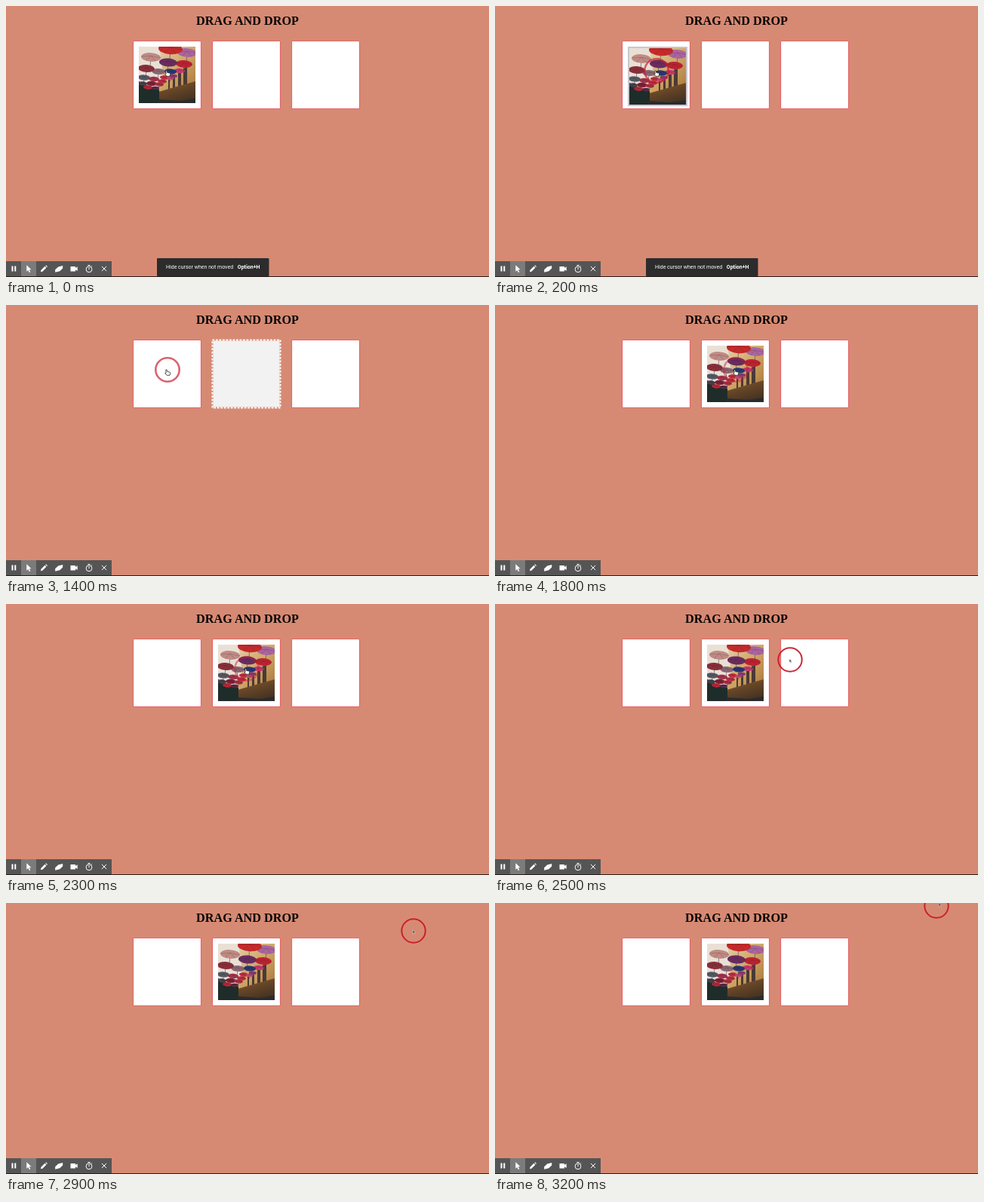
Write an HTML page that moves like this. It is 640x360 px and loops after 3.3 s.

```html
<!DOCTYPE html>
<html lang="en">
<head>
<meta charset="utf-8">
<title>Drag and drop</title>
<style>
html, body { margin: 0; width: 100%; height: 100%; overflow: hidden; background: #d78a73; }
svg { display: block; width: 100vw; height: 100vh; }
.title { font: bold 16.2px "Liberation Serif", Times, serif; text-anchor: middle; }
.toast text { font: 7px Roboto, sans-serif; fill: #fff; }
.toast .key { font-weight: 700; }
.slot { fill: #fff; stroke: #e5666d; stroke-width: 1.2; }
.anim, .anim * { animation: 3.3s step-end infinite; }

/* The picture is picked up at 0.9 s and dropped at 1.7 s. */
#photo { animation-name: photo; }
@keyframes photo {
  0% { transform: translate(176px, 54px); }
  3.0303% { transform: translate(178px, 56px); }
  27.2727% { transform: translate(178px, 56px); visibility: hidden; }
  51.5152%, 100% { transform: translate(281px, 54px); visibility: visible; }
}
#frame { animation-name: frame; }
@keyframes frame {
  0% { opacity: 0; }
  3.0303% { opacity: 1; }
  27.2727%, 100% { opacity: 0; }
}
#target { animation-name: target; }
@keyframes target {
  0% { opacity: 0; }
  42.4242% { opacity: 1; }
  51.5152%, 100% { opacity: 0; }
}
#toast { animation-name: toast; }
@keyframes toast { 0% { opacity: 1; } 36.3636%, 100% { opacity: 0; } }

#mover { animation-name: mover; }
@keyframes mover {
  0% { transform: translate(214px, 86px); }
  51.5152% { transform: translate(319px, 86px); }
  72.7273% { transform: translate(340px, 83px); }
  75.7576% { transform: translate(391px, 74px); }
  78.7879% { transform: translate(464px, 59px); }
  81.8182% { transform: translate(522px, 48px); }
  84.8485% { transform: translate(531px, 44px); }
  87.8788% { transform: translate(540px, 37px); }
  90.9091% { transform: translate(556px, 25px); }
  93.9394% { transform: translate(574px, 13px); }
  96.9697%, 100% { transform: translate(585px, 4px); }
}
#ring { animation-name: ring; }
@keyframes ring {
  0% { opacity: 0; stroke-width: 2.6px; }
  3.0303% { opacity: .4; }
  6.0606% { opacity: .68; stroke-width: 2.6px; }
  51.5152% { opacity: .45; }
  72.7273%, 100% { opacity: .95; stroke-width: 2px; }
}
#fist { animation-name: fist; }
@keyframes fist { 0% { opacity: 0; } 27.2727% { opacity: 1; } 30.303%, 100% { opacity: 0; } }
#hand { animation-name: hand; }
@keyframes hand {
  0% { opacity: 1; }
  27.2727% { opacity: 0; }
  30.303% { opacity: 1; }
  72.7273%, 100% { opacity: 0; }
}
#arrow { animation-name: arrow; }
@keyframes arrow {
  0% { opacity: 0; transform: translate(-1px, -1px); }
  72.7273% { opacity: 1; transform: translate(-1px, -1px); }
  96.9697%, 100% { opacity: 1; transform: translate(3px, -4px); }
}
</style>
</head>
<body>
<svg viewBox="0 0 640 360" preserveAspectRatio="none">
  <defs>
    <clipPath id="crop"><path d="M0 0H75V75H0Z"/></clipPath>
    <linearGradient id="wall" x2="1" y2="1">
      <stop offset="0" stop-color="#e6d3b0"/>
      <stop offset=".5" stop-color="#d0a768"/>
      <stop offset="1" stop-color="#a87538"/>
    </linearGradient>
    <linearGradient id="road" x2=".5" y2="1">
      <stop offset="0" stop-color="#8f6433"/>
      <stop offset=".5" stop-color="#654527"/>
      <stop offset="1" stop-color="#453322"/>
    </linearGradient>
    <path id="pointer" d="M0 0V9L2.2 7.1 3.8 10.5 5.4 9.8 3.8 6.5H6.7Z"/>
  </defs>

  <rect width="640" height="360" fill="#d78a73"/>
  <path d="M0 359.5H640" stroke="#2a1c18"/>
  <text class="title" x="320" y="25">DRAG AND DROP</text>
  <rect class="slot" x="168.5" y="46.5" width="90" height="90" rx="1"/>
  <rect class="slot" x="273.5" y="46.5" width="90" height="90" rx="1"/>
  <rect class="slot" x="378.5" y="46.5" width="90" height="90" rx="1"/>

  <g class="anim">
    <g id="target">
      <rect x="272.5" y="45.5" width="92" height="92" fill="#d78a73"/>
      <rect x="274.5" y="47.5" width="88" height="88" fill="#f2f2f2"/>
      <rect x="273.5" y="46.5" width="90" height="90" fill="none" stroke="#fff" stroke-width="2" stroke-dasharray="2.8 1.7"/>
    </g>

    <g id="photo">
      <rect id="frame" x="-1" y="-1" width="77" height="77" fill="none" stroke="#c9c6cd" stroke-width="2"/>
      <g clip-path="url(#crop)">
        <rect width="75" height="75" fill="#e9e0d5"/>
        <path d="M27 0H75V60H24L32 36Z" fill="url(#wall)"/>
        <path d="M59 29l5-2v23l-5 2zM52 34l4-1v21l-4 2zM45 38l3-1v20l-3 1zM39 43l2-1v17l-2 1z" fill="#4b3a35"/>
        <path d="M26 60L75 46V75H26Z" fill="url(#road)"/>
        <path d="M0 46L14 53 27 57V75H0Z" fill="#1e2c2a"/>
        <path d="M24 75L26 70 55 72 75 69V75Z" fill="#292b2e"/>
        <g id="canopy"></g>
      </g>
    </g>
  </g>

  <g fill="#fff">
    <rect y="339" width="140" height="20" fill="#555"/>
    <rect x="20" y="339" width="20" height="20" fill="#7b7b7b"/>
    <path d="M7.5 345.5h2v7h-2zM11.3 345.5h2v7h-2z"/>
    <use href="#pointer" transform="translate(27.3 344.3) scale(.93)"/>
    <path d="M46 353.2l.5-2.4 5-5 1.9 1.9-5 5zM52.2 345.1l.9-.8 1.9 1.9-.8.9z"/>
    <path d="M65.2 350.2l4-3.6 6-1.6v3.6l-4 3.6-6 1.6z"/>
    <path d="M85.5 346h6.5v2l2.7-1.8v5.8l-2.7-1.8v2.2h-6.5z"/>
    <g fill="none" stroke="#fff">
      <circle cx="110" cy="349.8" r="3.9"/>
      <path d="M108.4 344.5h3.2M110 347.4v2.8M113.2 346.2l.9-.9"/>
      <path d="M126.9 345.9l6.2 6.2m0-6.2l-6.2 6.2"/>
    </g>
  </g>

  <g class="anim">
    <g id="toast" class="toast">
      <rect x="200" y="335" width="148.5" height="24" rx="1" fill="#2c2c2c"/>
      <text x="212" y="349.4">Hide cursor when not moved</text>
      <text class="key" x="306.8" y="349.4">Option+H</text>
    </g>
    <g id="mover">
      <circle id="ring" r="15.7" fill="none" stroke="#c91b2b"/>
      <g fill="#fff" stroke="#222" stroke-width=".8" stroke-linejoin="round">
        <path id="hand" d="M-2.2 0q.8-.7 1.4.2l.6 2.3 3 .6q1 .3.8 1.4l-.5 2.8H-.9l-2.3-2.6q.1-1 1.3-.3z"/>
        <path id="fist" d="M-2.5 2.2q.6-1.3 1.5-.5.8-1 1.6-.1.9-.7 1.5.3.9-.2 1.1.8l-.4 3-.5 1.6h-3.7l-1.8-2.5q-.3-1.2.9-.8z"/>
        <g id="arrow"><use href="#pointer" transform="scale(.5)" fill="#111" stroke="#fff" stroke-width="1"/></g>
      </g>
    </g>
  </g>
</svg>
<script>
// Umbrellas: centre x, centre y, half width, colour.
const umbrellas = [
  [5, 49, 6, "#44434b"], [17, 49, 7, "#7d2234"], [27, 50, 6, "#a83343"],
  [12, 54, 6, "#bb2737"], [22, 55, 5, "#5a2945"], [31, 46, 6, "#c02d42"],
  [7, 41, 8, "#535b66"], [20, 43, 7, "#a5334d"], [34, 41, 6, "#c52c3f"],
  [42, 42, 5, "#ca4d78"], [46, 39, 5, "#913b76"], [26, 33, 9, "#8b6874"],
  [10, 29, 11, "#8a2f3b"], [54, 32, 7, "#c83b73"], [42, 33, 8, "#273772"],
  [60, 23, 11, "#bd2231"], [39, 21, 12, "#692c60"], [16, 14, 13, "#c08b84"],
  [64, 8, 13, "#aa659f"], [42, 3, 16, "#c52a2b"]
];

function umbrella([x, y, r, color]) {
  const h = r * 0.45, rib = r * 0.5;
  return `<g transform="translate(${x} ${y}) rotate(4)">
    <path d="M0 0V${r * 0.9}" stroke="#40303a" stroke-width=".5"/>
    <ellipse rx="${r}" ry="${h}" fill="${color}"/>
    <path d="M${-r} 0L0 ${-h * 0.3} ${r} 0M${-rib} ${h * 0.8}L0 ${-h * 0.3} ${rib} ${h * 0.8}" fill="none" stroke="#311c2b" stroke-opacity=".4" stroke-width=".5"/>
  </g>`;
}

document.getElementById("canopy").innerHTML = umbrellas.map(umbrella).join("");
</script>
</body>
</html>
```
